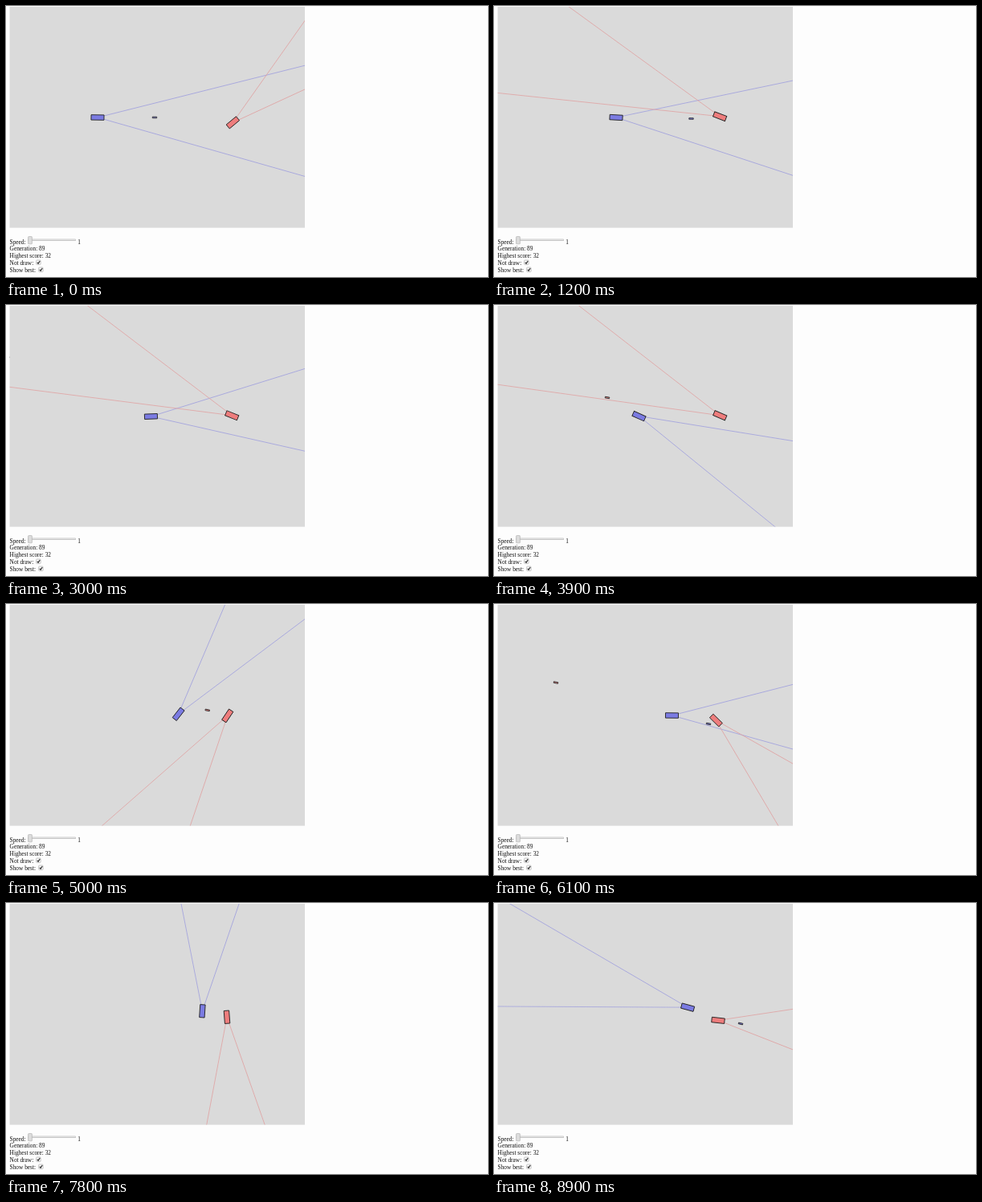
Animation, 600 px wide and 338 px high, one loop 9000 ms. Source, as an HTML page:

```html
<!DOCTYPE html>
<html lang="en">
<head>
<meta charset="utf-8">
<title>Duel simulation</title>
<style>
  html, body { margin: 0; width: 100%; height: 100%; overflow: hidden; background: #fdfdfd; }
  svg { display: block; }
  text { font: 7.35px "Liberation Serif", "Times New Roman", serif; fill: #111; }
  .widget { fill: #f4f4f4; stroke: #aaa; stroke-width: .6; }
  .tick { fill: none; stroke: #333; stroke-width: 1.2; }
</style>
</head>
<body>
<svg width="600" height="338" viewBox="0 0 600 338">
  <clipPath id="field"><rect x="4.6" y="1" width="367.4" height="275.6"/></clipPath>
  <rect x="4.6" y="1" width="367.4" height="275.6" fill="#dadada"/>
  <g id="scene" clip-path="url(#field)"></g>

  <text x="4.6" y="297">Speed:</text>
  <rect class="widget" x="28" y="291" width="58.5" height="1.7"/>
  <rect class="widget" x="27.6" y="287.6" width="4.8" height="9.2" rx=".6" style="fill:#ddd"/>
  <text x="89.3" y="297">1</text>
  <text x="4.6" y="305.2">Generation: 89</text>
  <text x="4.6" y="313.6">Highest score: 32</text>
  <text x="4.6" y="322.6">Not draw:</text>
  <text x="4.6" y="331.6">Show best:</text>
  <g id="check">
    <rect class="widget" x="37.6" y="317" width="5.6" height="5.6" rx="1"/>
    <path class="tick" d="M38.8 319.8l1.3 1.4 2.2-3.2"/>
  </g>
  <use href="#check" x="3" y="9"/>
</svg>
<script>
const scene = document.getElementById('scene');
const RAD = Math.PI / 180;
const SPIN = 39.87;            // degrees per step while turning
const LAP = 360 / SPIN;        // steps per full turn
const RADIUS = 4.5, SHOT_SPEED = 16.1;
const BLUE = { fill: '#7b7be2', ray: '#a3a3de' };
const RED = { fill: '#ee7d7d', ray: '#e0a5a5' };

// Blue drives right, with three full loops and then an endless one.
const loops = [[12.5, LAP], [30.6, LAP], [48.7, LAP], [66.81, Infinity]];
const drift = [[0, .9], [12, 3.2], [22, -3.5], [39, -.9], [61, .6], [67, 0], [90, 0]];

// Shots: shooter, known step and place, heading, first and last step.
const shots = [
  [BLUE, 0, 185, 139, .9, 0, 5],
  [BLUE, 12, 245.5, 140.5, 1.2, 4.7, 13],
  [BLUE, 22, 161, 140, 1, 21.6, 28],
  [BLUE, 39.6, 182.5, 139, 1, 39.6, 45],
  [BLUE, 61, 267, 149.5, 10.5, 57.5, 90],
  [BLUE, 75.6, 240, 135, 13, 75.6, 77],
  [BLUE, 89, 307, 150.5, 13, 84.6, 90],
  [RED, 22, 126, 97.5, 194.7, 12.15, 90],
  [RED, 39, 141, 115.5, 189, 30.25, 90],
  [RED, 61, 77, 98, 191.2, 48.3, 90],
  [RED, 66.4, 279, 137.5, 191, 66.4, 68]
];

function lerpKeys(keys, n) {
  const i = keys.findIndex(k => k[0] > n);
  const [n0, v0] = keys[i - 1], [n1, v1] = keys[i];
  return v0 + (v1 - v0) * (n - n0) / (n1 - n0);
}

// A point on a circle driven counterclockwise, with the given heading.
const orbit = (x, y, a) =>
  ({ x: x - RADIUS * Math.sin(a * RAD), y: y + RADIUS * Math.cos(a * RAD), a });

function bluePose(n) {
  let turned = 0;
  for (const [start, span] of loops) turned += Math.min(Math.max(n - start, 0), span);
  const pose = orbit(114 + 3.17 * (n - turned), 139 - RADIUS, -SPIN * turned);
  pose.a += lerpKeys(drift, n);
  return pose;
}

const redPose = n => orbit(279.5, 141.9, -39.8 - 39.93 * n);

const box = (x, y, a, w, h, fill, stroke) =>
  `<rect x="${-w / 2}" y="${-h / 2}" width="${w}" height="${h}" fill="${fill}" ` +
  `stroke="${stroke}" stroke-width=".9" transform="translate(${x} ${y}) rotate(${a})"/>`;

const rays = ({ x, y, a }, { ray }) => [-15, 15].map(d =>
  `<path d="M0 0H600" stroke="${ray}" stroke-width=".8" ` +
  `transform="translate(${x} ${y}) rotate(${a + d})"/>`).join('');

const car = ({ x, y, a }, { fill }) => box(x, y, a, 16, 6.4, fill, '#222');

function shot([owner, step, x, y, a, first, last], n) {
  if (n < first || n > last) return '';
  const d = SHOT_SPEED * (n - step);
  return box(x + d * Math.cos(a * RAD), y + d * Math.sin(a * RAD), a, 5.4, 1.6, owner.fill, '#333');
}

function draw(now) {
  const n = Math.floor(now / 100) % 90;
  const blue = bluePose(n), red = redPose(n);
  scene.innerHTML = rays(blue, BLUE) + rays(red, RED) + car(blue, BLUE) + car(red, RED) +
    shots.map(s => shot(s, n)).join('');
  requestAnimationFrame(draw);
}
draw(performance.now());
</script>
</body>
</html>
```
